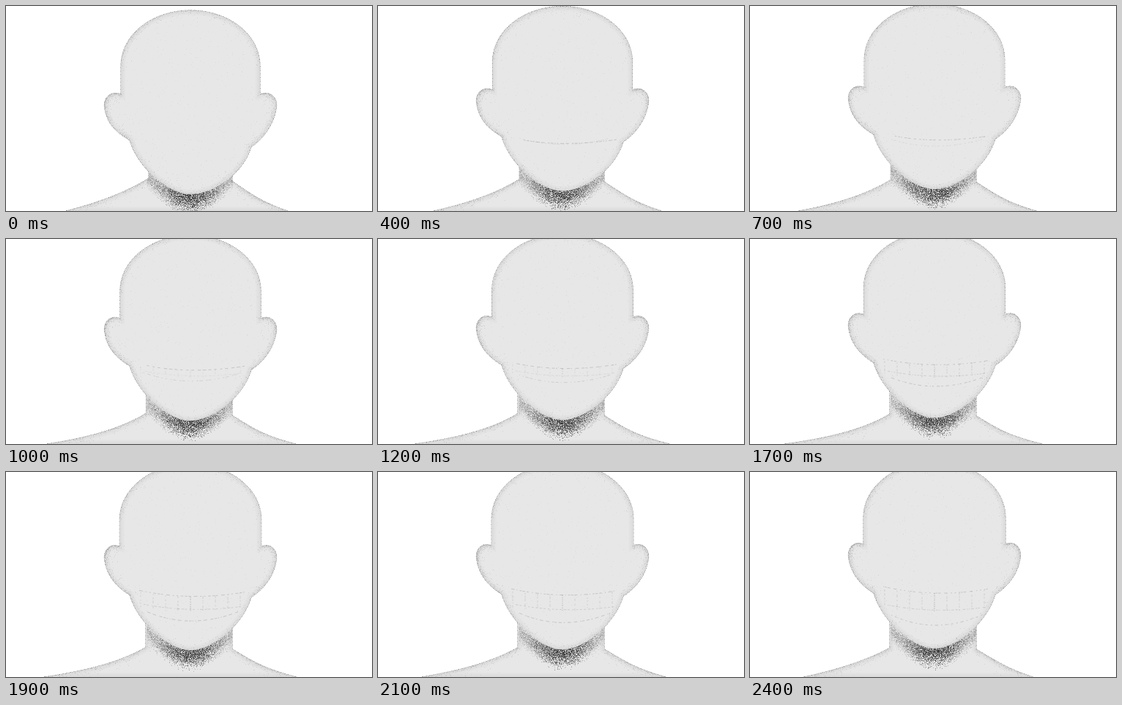
An HTML page with a canvas for the animation above (2.9 s loop, 500 by 281 pixels).

```html
<!DOCTYPE html>
<html lang="en">
<head>
<meta charset="utf-8">
<title>Stippled bust</title>
<style>
html, body { margin: 0; width: 100%; height: 100%; overflow: hidden; background: #fff; }
canvas { display: block; width: 500px; height: 281px; }
</style>
</head>
<body>
<canvas id="stage" width="500" height="281"></canvas>
<script>
const ctx = document.getElementById('stage').getContext('2d');
const LOOP = 2900, STEP = 100, LAST = 23;
const CENTER = 252, SKIN = '#e7e7e7';

const lerp = (a, b, k) => a + (b - a) * k;

function randomizer(seed) {
  return () => {
    seed = (seed + 0x6D2B79F5) | 0;
    let r = Math.imul(seed ^ (seed >>> 15), 1 | seed);
    r = (r + Math.imul(r ^ (r >>> 7), 61 | r)) ^ r;
    return ((r ^ (r >>> 14)) >>> 0) / 4294967296;
  };
}

function bezier(a, b, c, d) {
  return Array.from({ length: 41 }, (_, i) => {
    const k = i / 40, j = 1 - k;
    return [0, 1].map(n => j ** 3 * a[n] + 3 * j * j * k * b[n] + 3 * j * k * k * c[n] + k ** 3 * d[n]);
  });
}

// One half of the head, from the top of the crown to the chin
function headSide(dir, tilt, lobe) {
  const at = (dx, y) => [CENTER + dir * dx, y];
  const top = 6 - 20 * tilt, ear = 121 - 22 * tilt, chin = 258 - 16 * tilt;
  const wide = 95 + 2 * tilt;
  return [
    ...bezier(at(0, top), at(50, top), at(wide, top + 31), at(wide, top + 77)),
    ...bezier(at(wide, ear), at(112, ear - 6), at(120, ear + 8), at(117, ear + 20)),
    ...bezier(at(117, ear + 20), at(113, ear + 45), at(96, lobe - 8), at(83, lobe)),
    ...bezier(at(83, lobe), at(72, lobe + 38), at(30, chin), at(0, chin))
  ];
}

function headOutline(tilt) {
  const right = headSide(1, tilt, 193 - 25 * tilt);
  const left = headSide(-1, tilt, 184 - 18 * tilt);
  return [...right, ...left.reverse()];
}

// The shoulders widen and narrow again while the head tilts
function bodyOutline(tilt, spread) {
  const neck = 195 - 4 * Math.min(1, tilt * 1.6);
  const left = CENTER - 170 - 5 * tilt - 32 * spread, right = CENTER + 133 + 15 * spread;
  return [
    ...bezier([left, 281], [120, 271], [160, 258], [neck, 236 + 5 * tilt]),
    [neck, 200], [309, 200],
    ...bezier([309, 240 + 3 * tilt], [335, 258], [350, 269], [right, 281])
  ];
}

function toPath(points) {
  const path = new Path2D();
  points.forEach(([x, y]) => path.lineTo(x, y));
  path.closePath();
  return path;
}

function dot(x, y, tone, alpha) {
  ctx.fillStyle = `rgba(${tone},${tone},${tone},${alpha})`;
  ctx.fillRect(Math.round(x), Math.round(y), 1, 1);
}

function rim(path) {
  ctx.strokeStyle = '#666';
  ctx.lineWidth = 1;
  ctx.setLineDash([2, 1, 1, 1]);
  ctx.stroke(path);
  ctx.setLineDash([]);
}

function within(path, paint) {
  ctx.fillStyle = SKIN;
  ctx.fill(path);
  ctx.save();
  ctx.clip(path);
  paint();
  ctx.restore();
}

// Soft grey edge with dots thinning out inwards
function shadeEdge(points, path, rand, amount) {
  ctx.strokeStyle = 'rgba(90,90,90,.03)';
  for (const w of [3, 7, 12]) {
    ctx.lineWidth = w;
    ctx.stroke(path);
  }
  for (let i = 0; i < amount; i++) {
    const [x, y] = points[Math.floor(rand() * points.length)];
    const reach = -4 * Math.log(1 - rand()), angle = rand() * Math.PI * 2;
    dot(x + Math.cos(angle) * reach, y + Math.sin(angle) * reach, 130, .06 + .18 * rand());
  }
}

function chinShadow(tilt, rand) {
  const chin = 258 - 16 * tilt;
  const bell = () => rand() + rand() + rand() - 1.5;
  for (let i = 0; i < 7500; i++) {
    const dx = (rand() - .5) * 118;
    const near = Math.exp(-((dx / 33) ** 2));
    const drop = 4 + bell() * (14 + 4 * near);
    dot(CENTER - 1 + dx, chin - .0085 * dx * dx + drop, 25, (.05 + .36 * near) * (.3 + .9 * rand()));
  }
}

function mouth(tilt, rand) {
  const ink = (alpha, segment) => {
    ctx.strokeStyle = `rgba(110,110,110,${alpha})`;
    ctx.setLineDash(Array.from({ length: 12 }, () => 1 + rand() * segment));
  };
  const curve = (x1, y1, middle, x2, y2) => {
    ctx.beginPath();
    ctx.moveTo(x1, y1);
    ctx.quadraticCurveTo(CENTER, 2 * middle - (y1 + y2) / 2, x2, y2);
    ctx.stroke();
  };
  const shown = Math.min(1, tilt * 4), open = Math.max(0, Math.min(1, (tilt - .4) * 2.5));
  const top = 197 - 31 * tilt, low = 188 + 22 * tilt ** 2, mid = lerp(top, low, .53);
  const corner = 180 + 16 * tilt ** 2;

  ctx.lineWidth = 1;
  ink(.28 * shown, 4);
  curve(lerp(199, 182, open), 194 - 37 * tilt, top, 326, 192 - 32 * tilt);
  ink(lerp(.12, .28, open) * shown, 4);
  curve(193, corner, low, 317, corner);
  ink(.22 * open, 3);
  curve(188, mid - 7, mid, 322, mid - 4);

  for (let tooth = -4; tooth <= 4; tooth++) {
    const bend = (tooth / 4) ** 2;
    ink((tooth ? .2 : .4) * open, tooth ? 3 : 1);
    ctx.beginPath();
    ctx.moveTo(CENTER + tooth * 17, top - 5 * bend);
    ctx.lineTo(CENTER + tooth * 17, mid + 2 - 5 * bend);
    ctx.stroke();
  }
}

function draw(step) {
  const tilt = (step / LAST) ** .63;
  const spread = Math.sin(Math.PI * (step / (LAST + 1)) ** 1.3) ** 1.25;
  const rand = randomizer(step * 977 + 5);
  const headPoints = headOutline(tilt), bodyPoints = bodyOutline(tilt, spread);
  const head = toPath(headPoints), body = toPath(bodyPoints);

  ctx.fillStyle = '#fff';
  ctx.fillRect(0, 0, 500, 281);
  rim(head);
  rim(body);

  within(body, () => {
    shadeEdge(bodyPoints, body, rand, 900);
    chinShadow(tilt, rand);
  });
  within(head, () => {
    shadeEdge(headPoints, head, rand, 2600);
    for (let i = 0; i < 900; i++) dot(150 + rand() * 205, rand() * 250, 150, .16 * rand());
    mouth(tilt, rand);
  });
}

let shownStep = -1;
const start = performance.now();

function tick() {
  const t = (performance.now() - start) % LOOP;
  const step = Math.max(0, Math.min(LAST, Math.floor(t / STEP) - 1));
  if (step !== shownStep) draw(shownStep = step);
  requestAnimationFrame(tick);
}
tick();
</script>
</body>
</html>
```
